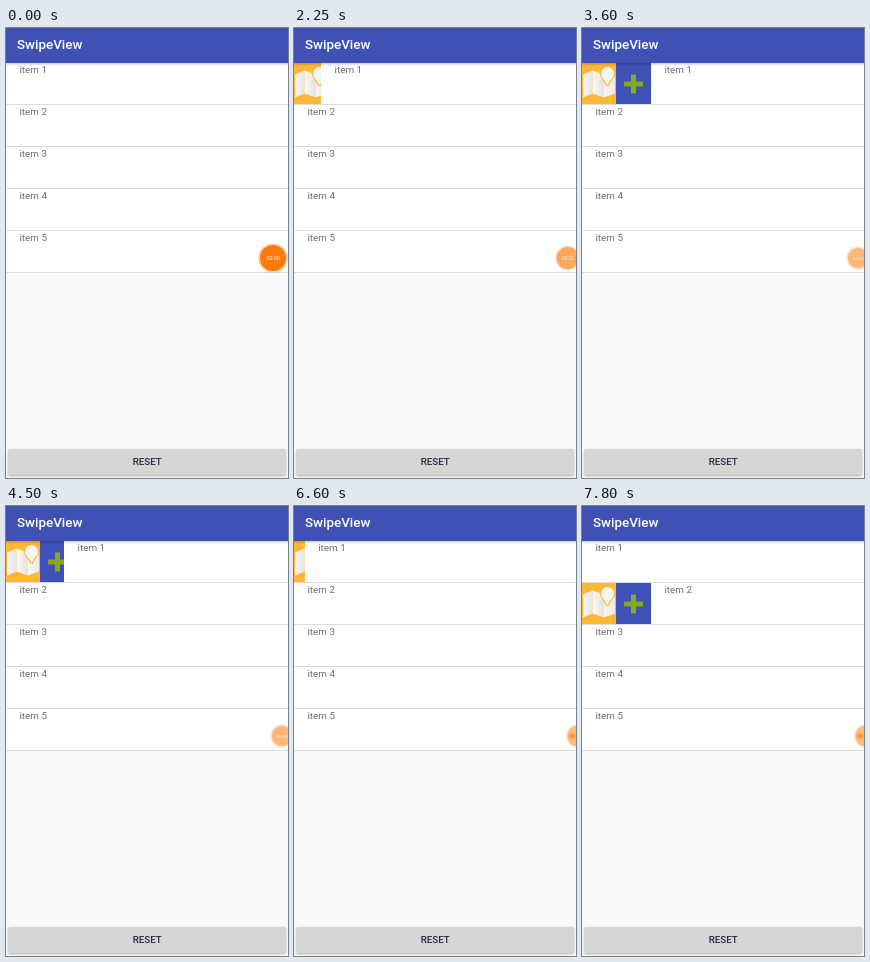
Animation of 282x450 px, one loop 8000 ms. Source, as an HTML page with a canvas:

```html
<!DOCTYPE html>
<html lang="en">
<head>
<meta charset="utf-8">
<title>SwipeView</title>
<style>
html, body { margin: 0; width: 100%; height: 100%; overflow: hidden; background: #fafafa; }
canvas { display: block; width: 282px; height: 450px; }
</style>
</head>
<body>
<canvas id="stage" width="282" height="450"></canvas>
<script>
const ctx = document.getElementById('stage').getContext('2d');
const W = 282, H = 450, LOOP = 8000, STEP = 150;
const TOP = 35, ROW = 42, CELL = 34, OPEN = 69;
const FONT = 'Roboto, "Noto Sans", sans-serif';
const ORANGE = '#ffb834', BLUE = '#3f51b5';

// Swipes per row as [start, end] in ms; each one toggles the row open or closed.
const swipes = [
  [[1950, 2650], [4400, 4800], [5300, 5700], [6300, 6700]],
  [[6800, 7500]]
];

function ease(t, from, to) {
  const p = Math.min(1, Math.max(0, (t - from) / (to - from)));
  return p * p * (3 - 2 * p);
}

function offset(i, t) {
  const moves = swipes[i] || [];
  return OPEN * moves.reduce((sum, [a, b], n) => sum + (n % 2 ? -1 : 1) * ease(t, a, b), 0);
}

function rect(x, y, w, h, color) {
  ctx.fillStyle = color;
  ctx.fillRect(x, y, w, h);
}

function disc(x, y, r, color) {
  ctx.beginPath();
  ctx.arc(x, y, r, 0, Math.PI * 2);
  ctx.fillStyle = color;
  ctx.fill();
}

function label(str, x, y, size, color, weight = 400, align = 'left') {
  ctx.font = `${weight} ${size}px ${FONT}`;
  ctx.textAlign = align;
  ctx.fillStyle = color;
  ctx.fillText(str, x, y);
}

function shade(x0, y0, x1, y1, from, to) {
  const g = ctx.createLinearGradient(x0, y0, x1, y1);
  g.addColorStop(0, from);
  g.addColorStop(1, to);
  return g;
}

// One fold of the map: a slanted strip between x0 and x1.
function fold(x0, x1, y0, y1, from, to) {
  const h = 23;
  ctx.beginPath();
  ctx.moveTo(x0, y0);
  ctx.lineTo(x1, y1);
  ctx.lineTo(x1, y1 + h);
  ctx.lineTo(x0, y0 + h);
  ctx.fillStyle = shade(x0, 0, x1, 0, from, to);
  ctx.fill();
}

function mapIcon() {
  fold(1, 10.5, 11.5, 7.5, '#f6f5f2', '#e6e5e2');
  fold(10.5, 22, 7.5, 11.5, '#fbfaf8', '#e3e1dd');
  fold(22, 33, 11.5, 7.5, '#f8f7f4', '#ebe9e5');
  ctx.beginPath();
  ctx.moveTo(25.5, 23);
  ctx.bezierCurveTo(24, 17, 19, 15, 19, 10.5);
  ctx.arc(25.5, 10.5, 6.5, Math.PI, 0);
  ctx.bezierCurveTo(32, 15, 27, 17, 25.5, 23);
  ctx.strokeStyle = ORANGE;
  ctx.lineWidth = 2.4;
  ctx.stroke();
  ctx.fillStyle = '#f8f6f2';
  ctx.fill();
}

function actions(y, width) {
  ctx.save();
  ctx.beginPath();
  ctx.rect(0, y, Math.round(width), ROW - 1);
  ctx.clip();
  ctx.translate(0, y);
  rect(0, 0, CELL, ROW, ORANGE);
  rect(CELL, 0, OPEN - CELL, ROW, BLUE);
  mapIcon();
  rect(42, 18.5, 19, 5, '#86aa1c');
  rect(49, 11.5, 5, 19, '#86aa1c');
  ctx.restore();
}

function row(i, t) {
  const y = TOP + i * ROW, dx = offset(i, t);
  rect(0, y, W, ROW, '#ffffff');
  if (dx > 0) actions(y, dx);
  label('item ' + (i + 1), 13.4 + dx, y + 10.4, 9.9, '#6c6c6c');
  rect(0, y + ROW - 1, W, 1, '#dcdcdc');
}

function header() {
  rect(0, TOP, W, 3, shade(0, TOP, 0, TOP + 3, 'rgba(0,0,0,.2)', 'rgba(0,0,0,0)'));
  rect(0, 0, W, TOP, BLUE);
  label('SwipeView', 11, 21.2, 13.4, '#ffffff', 500);
}

function button() {
  ctx.save();
  ctx.shadowColor = 'rgba(0,0,0,.32)';
  ctx.shadowBlur = 2.5;
  ctx.shadowOffsetY = 1;
  ctx.beginPath();
  ctx.roundRect(2.5, 421, 277, 26, 1.2);
  ctx.fillStyle = '#d6d6d6';
  ctx.fill();
  ctx.restore();
  label('RESET', 141.2, 437.3, 9.7, '#292944', 500, 'center');
}

// Recording badge: shrinks and fades at the edge, then slides half out.
function recorder(t) {
  const dock = ease(t, 1950, 2400), hide = ease(t, 4800, 4950);
  const x = 267 + 9 * dock + 7.5 * hide, y = 230, r = 14.5 - 3 * dock;
  const mix = (a, b) => Math.round(a + (b - a) * dock);
  disc(x, y, r + 0.5, `rgba(150,125,105,${0.2 - dock * 0.15})`);
  disc(x, y, r, `rgb(${mix(248, 254)},${mix(212, 226)},${mix(178, 204)})`);
  disc(x, y, r - 1.4, `rgb(${mix(255, 251)},${mix(122, 184)},${mix(10, 120)})`);
  if (hide) disc(278, y, 2.8, '#f79a3c');
  else label('00:0' + Math.floor(t / 1000), x + 0.3, y + 2, 5.4 - dock, `rgba(255,255,255,${0.9 - dock * 0.2})`, 400, 'center');
}

function draw(now) {
  const t = Math.floor((now % LOOP) / STEP) * STEP;
  rect(0, 0, W, H, '#fafafa');
  for (let i = 0; i < 5; i++) row(i, t);
  header();
  button();
  recorder(t);
}

let start;
function tick(now) {
  start ??= now;
  draw(Math.max(0, now - start));
  requestAnimationFrame(tick);
}
draw(0);
requestAnimationFrame(tick);
</script>
</body>
</html>
```
